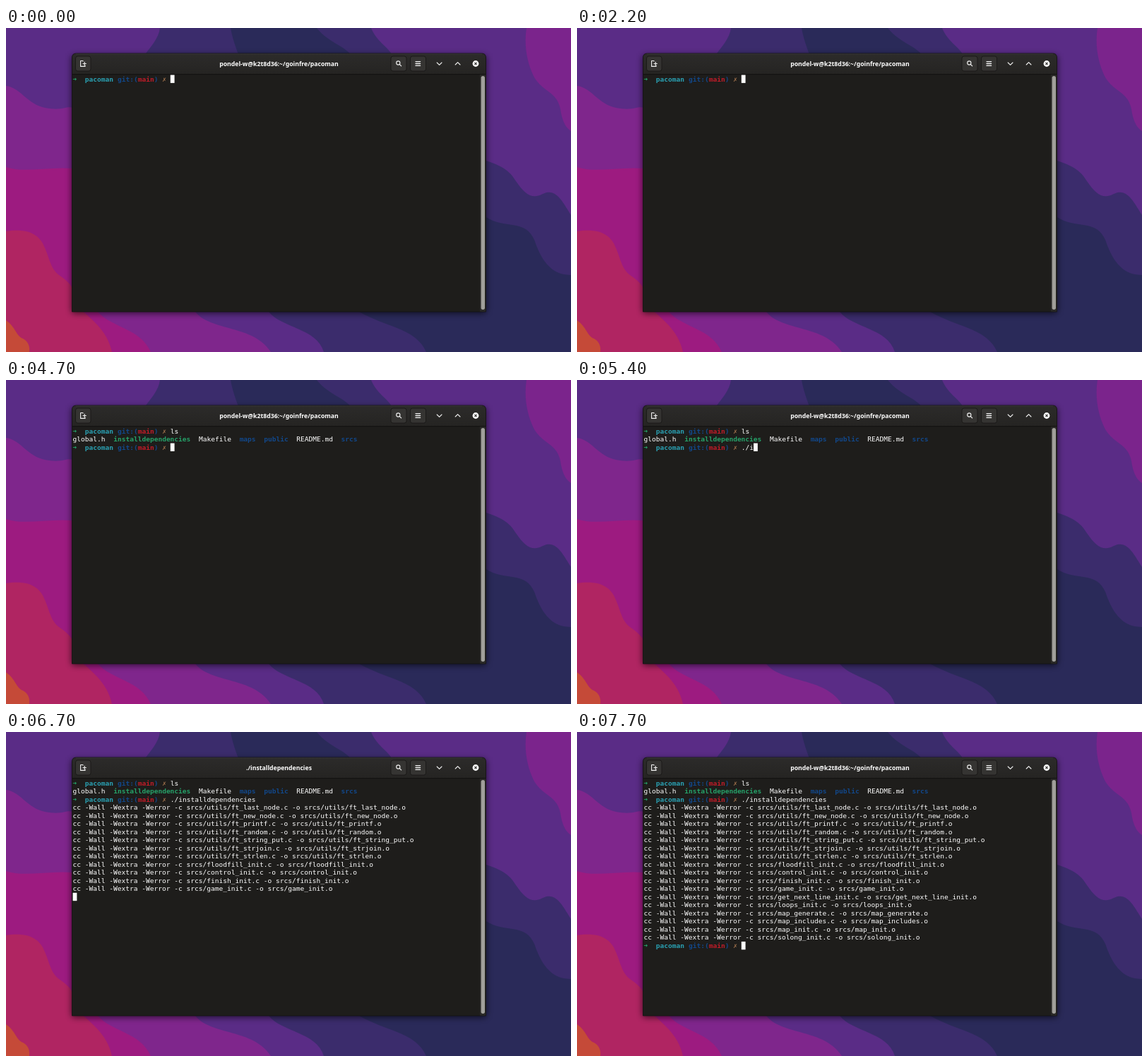
These frames come from a looping animation (800x459 px, 8000 ms). An HTML page:

```html
<!DOCTYPE html>
<html lang="en">
<head>
<meta charset="utf-8">
<title>Terminal session</title>
<style>
  html, body { margin: 0; width: 100%; height: 100%; overflow: hidden; background: #2a2a59; }
  svg { display: block; width: 100vw; height: 100vh; }
  text { white-space: pre; }
  .title { font: 700 8.7px "Noto Sans", "Open Sans", sans-serif; fill: #fff; text-anchor: middle; }
  .term { font: 9.56px "DejaVu Sans Mono", monospace; }
  .icon { fill: none; stroke: #f2f2f2; stroke-width: 1.1; stroke-linecap: round; stroke-linejoin: round; }
</style>
</head>
<body>
<svg viewBox="0 0 800 459" preserveAspectRatio="none">
  <defs>
    <linearGradient id="bar" x1="0" y1="0" x2="0" y2="1">
      <stop offset="0" stop-color="#2c2b2a"/>
      <stop offset="1" stop-color="#252422"/>
    </linearGradient>
    <filter id="blur" x="-10%" y="-10%" width="120%" height="120%">
      <feGaussianBlur stdDeviation="4"/>
    </filter>
  </defs>

  <!-- wallpaper waves -->
  <rect width="800" height="459" fill="#2a2a59"/>
  <path fill="#3b2c6c" d="M318 0C320 12 324 24 330 40C360 200 420 330 500 402C540 425 580 425 595 459H0V0Z"/>
  <path fill="#5a2c86" d="M218 0C216 15 206 25 195 40C200 200 300 330 372 402C390 425 440 425 450 459H0V0Z"/>
  <path fill="#7f268c" d="M0 82C20 84 30 108 55 113S85 110 95 113C150 200 200 330 268 402C290 430 350 420 375 459H0Z"/>
  <path fill="#9d1b80" d="M0 197C25 206 60 196 95 199C110 260 110 340 130 402C150 425 190 425 205 459H0Z"/>
  <path fill="#b02562" d="M0 288C15 286 40 284 52 305C62 325 62 340 75 350C85 357 92 362 95 372C98 390 105 400 112 404C130 420 145 435 150 459H0Z"/>
  <path fill="#c54a38" d="M0 414C14 424 14 436 24 440C32 444 34 452 33 459H0Z"/>
  <path fill="#3b2c6c" d="M440 0C455 20 480 25 490 40C540 150 620 230 680 268C705 285 735 270 748 300C760 335 775 350 800 350V0Z"/>
  <path fill="#5a2c86" d="M517 0C525 20 540 25 548 40C580 110 630 170 680 188C700 195 712 200 722 217C735 236 745 243 760 235C780 225 790 250 800 265V0Z"/>
  <path fill="#7b248c" d="M737 0C733 25 738 50 748 70C762 92 780 90 785 115C788 135 794 142 800 146V0Z"/>

  <!-- window -->
  <rect x="92" y="38" width="589" height="367" rx="6" fill="#000" opacity=".55" filter="url(#blur)"/>
  <path fill="#1e1d1b" stroke="#131212" stroke-width=".8" d="M93.5 402V42Q93.5 36 99.5 36H673.5Q679.5 36 679.5 42V402Z"/>
  <path fill="url(#bar)" d="M94 66V42Q94 36.5 99.5 36.5H673.5Q679 36.5 679 42V66Z"/>
  <path stroke="#121110" d="M94 65.6H679"/>
  <path stroke="#fff" stroke-opacity=".1" stroke-width=".7" d="M99 36.8H674"/>
  <rect x="671" y="66" width="8.3" height="335.6" fill="#2a2927"/>
  <rect x="672.6" y="68" width="5.4" height="331" rx="2.7" fill="#a09f9a"/>

  <g fill="#353432" stroke="#171615" stroke-width=".8">
    <rect x="98.5" y="40" width="21.5" height="21" rx="3"/>
    <rect x="545" y="40" width="22" height="21" rx="3"/>
    <rect x="572.5" y="40" width="22" height="21" rx="3"/>
  </g>
  <g class="icon">
    <path d="M109 47V46.5H105.6V54.4H112V53M109 50.5H113.4M111.2 48.3V52.7"/>
    <circle cx="555.3" cy="49.5" r="2.6"/>
    <path d="M557.3 51.5L559.7 53.9"/>
    <path stroke-width="1.3" d="M580 47.6H586.6M580 50.5H586.6M580 53.4H586.6"/>
    <path d="M610.2 49L613.6 52.3L617 49M636.2 52L639.6 48.7L643 52"/>
  </g>
  <circle cx="665" cy="50.5" r="4.4" fill="#fff"/>
  <path stroke="#282726" stroke-width="1.1" d="M663.4 48.9L666.6 52.1M666.6 48.9L663.4 52.1"/>

  <text id="title" class="title" x="386.5" y="53.6"></text>
  <g id="term" class="term"></g>
  <rect id="cursor" width="5.8" height="11.4" fill="#fff"/>
</svg>

<script>
const LOOP = 8000, BLINK = 600;
const LEFT = 94.6, TOP = 66.5, COL = 5.757, ROW = 11.52, ASCENT = 9;
const PROMPT_COLS = 24;
const HOME = "pondel-w@k2t8d36:~/goinfre/pacoman";
const COMMAND = "./installdependencies";
const WHITE = "#fff", GREEN = "#26a269", CYAN = "#2aa1b3",
      BLUE = "#12488b", RED = "#c01c28", YELLOW = "#a2734c";

const title = document.getElementById("title");
const term = document.getElementById("term");
const cursor = document.getElementById("cursor");

// Each span is [column, text, colour, bold]
const prompt = [
  [0, "➜", GREEN, 1], [3, "pacoman", CYAN, 1], [11, "git:(", BLUE, 1],
  [16, "main", RED, 1], [20, ")", BLUE, 1], [22, "✗", YELLOW, 1]
];
const listing = [
  [0, "global.h", WHITE], [10, "installdependencies", GREEN, 1],
  [31, "Makefile", WHITE], [41, "maps", BLUE, 1], [47, "public", BLUE, 1],
  [55, "README.md", WHITE], [66, "srcs", BLUE, 1]
];
const utils = ["last_node", "new_node", "printf", "random", "string_put", "strjoin", "strlen"]
  .map(name => "utils/ft_" + name);
const sources = utils.concat(
  "floodfill_init control_init finish_init game_init get_next_line_init loops_init map_generate map_includes map_init solong_init".split(" "));
const compiled = sources.map(name =>
  [[0, `cc -Wall -Wextra -Werror -c srcs/${name}.c -o srcs/${name}.o`, WHITE]]);

// Typed text, and counts of compiled files, by start time
const firstInput = [[0, ""], [3300, "ls"]];
const secondInput = [[3500, ""], [5000, "./"], [5100, "./i"], [5600, "./ins"], [5700, COMMAND + " "]];
const progress = [[6500, 3], [6600, 7], [6700, 11], [6800, 14], [6900, sources.length]];
// Moments at which the cursor turns solid again
const keys = [[-200, -200], [3300, 3300], [3500, 3500], [5000, 5000], [5100, 5100],
              [5600, 5600], [5700, 5700], [6500, 6500]];
const RUN = 6500, DONE = 7000;

function latest(steps, t) {
  let value = steps[0][1];
  for (const [start, v] of steps) if (t >= start) value = v;
  return value;
}

function entry(input) {
  return prompt.concat([[PROMPT_COLS, input, WHITE]]);
}

function screenAt(t) {
  const rows = [entry(latest(firstInput, t))];
  let col = PROMPT_COLS + latest(firstInput, t).length;
  if (t >= 3500) {
    const input = latest(secondInput, t);
    rows.push(listing, entry(input));
    col = PROMPT_COLS + input.length;
  }
  if (t >= RUN) {
    rows.push(...compiled.slice(0, latest(progress, t)));
    rows.push(t >= DONE ? entry("") : []);
    col = t >= DONE ? PROMPT_COLS : 0;
  }
  return { rows, col };
}

function drawRows(rows) {
  term.textContent = "";
  rows.forEach((spans, i) => {
    for (const [col, text, fill, bold] of spans) {
      const el = document.createElementNS(term.namespaceURI, "text");
      el.setAttribute("x", LEFT + col * COL);
      el.setAttribute("y", TOP + ASCENT + i * ROW);
      el.setAttribute("fill", fill);
      if (bold) el.setAttribute("font-weight", 700);
      el.textContent = text;
      term.append(el);
    }
  });
}

let shown = "";
function render(t) {
  const { rows, col } = screenAt(t);
  const state = JSON.stringify(rows);
  if (state !== shown) {
    drawRows(rows);
    shown = state;
  }
  title.textContent = t >= RUN && t < DONE ? COMMAND : HOME;
  cursor.setAttribute("x", LEFT + col * COL);
  cursor.setAttribute("y", TOP + (rows.length - 1) * ROW);
  const phase = Math.floor((t - latest(keys, t)) / BLINK);
  cursor.setAttribute("visibility", phase % 2 ? "hidden" : "visible");
}

function tick() {
  render(performance.now() % LOOP);
  requestAnimationFrame(tick);
}
tick();
</script>
</body>
</html>
```
